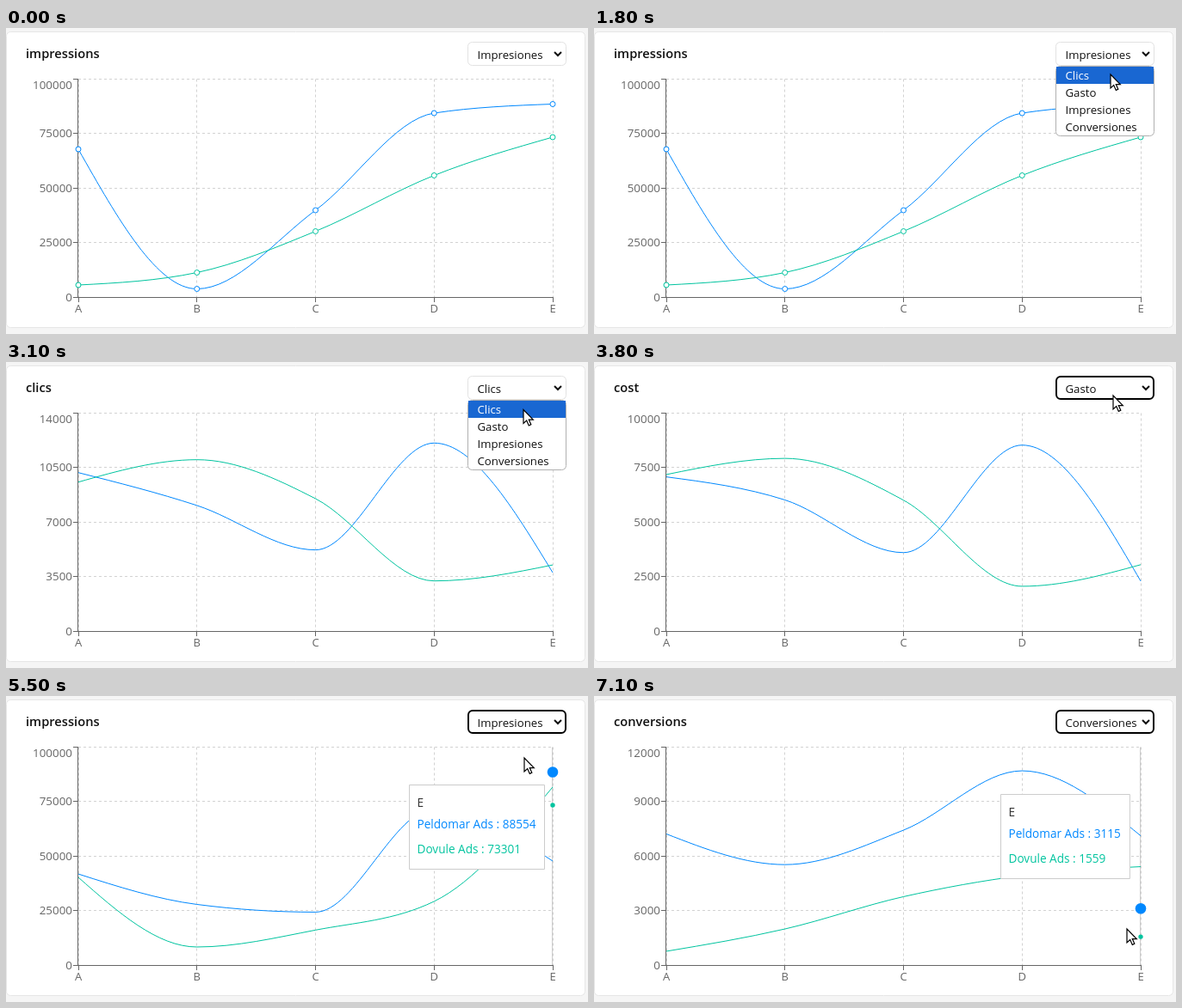
These frames come from a looping animation (676 px wide and 356 px high, 7200 ms). An HTML page with a canvas:

```html
<!DOCTYPE html>
<html lang="es">
<head>
<meta charset="utf-8">
<title>Metrics chart</title>
<style>
html, body { margin: 0; width: 100%; height: 100%; overflow: hidden; background: #f5f5f5; }
canvas { display: block; }
</style>
</head>
<body>
<canvas id="stage" width="676" height="356"></canvas>
<script>
const ctx = document.getElementById('stage').getContext('2d');
const LOOP = 7200, STEP = 100, MORPH = 1500;
const FONT = '"Open Sans", "Noto Sans", sans-serif';
const BLUE = '#0088fe', GREEN = '#00c49f';
const TOP = 59.5, BOTTOM = 313;
const XS = [0, 1, 2, 3, 4].map(i => 84 + i * 137.75);
const OPTIONS = ['Clics', 'Gasto', 'Impresiones', 'Conversiones'];

// Line heights are in stage pixels, one per category.
const VIEWS = {
  impressions: { option: 2, max: 100000, last: [88554, 73301],
    blue: [141, 303.5, 212, 99, 88.5], green: [299, 284.5, 236.5, 171.5, 127] },
  clics: { option: 0, max: 14000,
    blue: [128, 159, 219, 94, 254], green: [130.5, 103.8, 154.5, 259.5, 242.4] },
  cost: { option: 1, max: 10000,
    blue: [260, 193.6, 283, 157, 275], green: [140.5, 298, 301, 293, 89] },
  conversions: { option: 3, max: 12000, last: [3115, 1559],
    blue: [182.7, 73.8, 92.3, 73.4, 247.2], green: [294.7, 255.7, 230, 251.6, 280.1] }
};
const SELECTIONS = [
  { at: -MORPH, name: 'impressions' },
  { open: 1300, at: 2034, name: 'clics' },
  { open: 2900, at: 3710, name: 'cost' },
  { open: 4200, at: 5100, name: 'impressions' },
  { open: 6000, at: 6684, name: 'conversions' }
];
const POINTER = [
  [300, 676, 85], [800, 606, 38], [1000, 603, 34], [1400, 603, 34], [1800, 600, 54],
  [2034, 600, 55], [2400, 598, 37], [2900, 600, 37], [3300, 602, 74], [3700, 603, 72],
  [3800, 603, 39], [4200, 601, 39], [4500, 599, 84], [4800, 600, 95], [5100, 601, 95],
  [5500, 602, 72], [5800, 603, 35], [6000, 603, 35], [6400, 605, 114], [6700, 608, 115],
  [7100, 619, 271]
];
const TOOLTIP = [
  [5100, 468, 105], [5500, 468, 103], [5700, 468, 85], [6684, 468, 90], [7100, 472, 114]
];

const mix = (a, b, p) => a + (b - a) * p;

function track(keys, t) {
  let i = keys.findIndex(k => k[0] > t);
  if (i < 0) i = keys.length;
  const a = keys[Math.max(0, i - 1)], b = keys[Math.min(i, keys.length - 1)];
  const p = a === b ? 0 : (t - a[0]) / (b[0] - a[0]);
  return { x: mix(a[1], b[1], p), y: mix(a[2], b[2], p) };
}

// cubic-bezier(.25, .1, .25, 1)
function ease(x) {
  if (x <= 0 || x >= 1) return x <= 0 ? 0 : 1;
  let lo = 0, hi = 1, s;
  for (let i = 0; i < 24; i++) {
    s = (lo + hi) / 2;
    if (0.75 * s * (1 - s) + s ** 3 < x) lo = s; else hi = s;
  }
  return 0.3 * s * (1 - s) ** 2 + 3 * s * s * (1 - s) + s ** 3;
}

function line(x1, y1, x2, y2, color, dash = []) {
  ctx.strokeStyle = color;
  ctx.lineWidth = 1;
  ctx.setLineDash(dash);
  ctx.beginPath();
  ctx.moveTo(x1, y1);
  ctx.lineTo(x2, y2);
  ctx.stroke();
  ctx.setLineDash([]);
}

function box(x, y, w, h, radius, border, width = 1) {
  ctx.beginPath();
  ctx.roundRect(x, y, w, h, radius);
  ctx.fillStyle = '#fff';
  ctx.fill();
  ctx.strokeStyle = border;
  ctx.lineWidth = width;
  ctx.stroke();
}

function text(str, x, y, size, color, align = 'left', weight = 400) {
  ctx.font = `${weight} ${size}px ${FONT}`;
  ctx.textAlign = align;
  ctx.fillStyle = color;
  ctx.fillText(str, x, y);
}

function disc(x, y, r, fill, stroke) {
  ctx.beginPath();
  ctx.arc(x, y, r, 0, Math.PI * 2);
  ctx.fillStyle = fill;
  ctx.fill();
  if (stroke) {
    ctx.strokeStyle = stroke;
    ctx.lineWidth = 1;
    ctx.stroke();
  }
}

// Monotone cubic through equally spaced points.
function curve(ys, color) {
  const h = XS[1] - XS[0];
  const slope = ys.slice(1).map((y, i) => (y - ys[i]) / h);
  const tan = ys.map((_, i) => {
    if (!i || i === ys.length - 1) return 0;
    const a = slope[i - 1], b = slope[i];
    return (Math.sign(a) + Math.sign(b)) * Math.min(Math.abs(a), Math.abs(b), Math.abs(a + b) / 4);
  });
  const n = ys.length - 1;
  tan[0] = (3 * slope[0] - tan[1]) / 2;
  tan[n] = (3 * slope[n - 1] - tan[n - 1]) / 2;
  ctx.beginPath();
  ctx.moveTo(XS[0], ys[0]);
  for (let i = 0; i < n; i++) {
    ctx.bezierCurveTo(XS[i] + h / 3, ys[i] + tan[i] * h / 3,
      XS[i + 1] - h / 3, ys[i + 1] - tan[i + 1] * h / 3, XS[i + 1], ys[i + 1]);
  }
  ctx.strokeStyle = color;
  ctx.lineWidth = 1;
  ctx.stroke();
}

function drawAxes(max) {
  for (let k = 0; k < 5; k++) {
    const y = mix(BOTTOM, TOP, k / 4);
    const rowY = Math.floor(y) + 0.5, colX = Math.floor(XS[k]) + 0.5;
    line(84, rowY, 635, rowY, '#d2d2d2', [3, 3]);
    line(colX, TOP, colX, BOTTOM, '#d2d2d2', [3, 3]);
  }
  line(83.5, TOP, 83.5, BOTTOM + 1, '#666');
  line(84, 313.5, 635, 313.5, '#666');
  for (let k = 0; k < 5; k++) {
    const y = Math.floor(mix(BOTTOM, TOP, k / 4)) + 0.5;
    const x = Math.floor(XS[k]) + 0.5;
    line(78, y, 84, y, '#666');
    line(x, 313, x, 319, '#666');
    text(String(max * k / 4), 77, k === 4 ? 71 : y + 4.7, 13.4, '#666', 'right');
    text('ABCDE'[k], XS[k], 331, 13, '#666', 'center');
  }
}

function drawTooltip(view, t) {
  const { x, y } = track(TOOLTIP, t);
  const [first, second] = view.last;
  box(Math.round(x) + 0.5, Math.round(y) + 0.5, 121.5 + 7.1 * String(first).length, 98, 0, '#ccc');
  text('E', x + 9.5, y + 26, 13.6, '#333');
  text(`Peldomar Ads : ${first}`, x + 9.5, y + 50.5, 13.6, BLUE);
  text(`Dovule Ads : ${second}`, x + 9.5, y + 79.5, 13.6, GREEN);
}

function drawSelect(option, focused) {
  if (focused) box(537, 17, 113, 26, 5, '#000', 2);
  else box(536.5, 16.5, 114, 27, 5, '#e2e2e2');
  text(OPTIONS[option], 547.5, 36, 13.2, '#111');
  ctx.beginPath();
  ctx.moveTo(637, 28);
  ctx.lineTo(641, 32);
  ctx.lineTo(645, 28);
  ctx.strokeStyle = '#111';
  ctx.lineWidth = 2;
  ctx.stroke();
}

function drawMenu(active) {
  box(536.5, 44.5, 114, 81, 5, '#b0b0b0');
  OPTIONS.forEach((name, i) => {
    if (i === active) {
      ctx.fillStyle = '#1967d2';
      ctx.fillRect(537, 45 + i * 20, 113, 20);
    }
    text(name, 547.5, 60 + i * 20, 13.2, i === active ? '#fff' : '#111');
  });
}

function drawPointer({ x, y }) {
  const shape = [[0, 0], [0, 16], [3.7, 12.6], [6.3, 18.4], [8.8, 17.3], [6.3, 11.6], [11.3, 11.6]];
  ctx.beginPath();
  shape.forEach(([dx, dy]) => ctx.lineTo(x + dx, y + dy));
  ctx.closePath();
  ctx.fillStyle = '#fff';
  ctx.fill();
  ctx.strokeStyle = '#000';
  ctx.lineWidth = 1.2;
  ctx.stroke();
}

function draw(t) {
  const index = SELECTIONS.findLastIndex(s => t >= s.at);
  const current = SELECTIONS[index], next = SELECTIONS[index + 1];
  const view = VIEWS[current.name];
  const previous = VIEWS[SELECTIONS[Math.max(0, index - 1)].name];
  const progress = ease((t - current.at) / MORPH);
  const open = Boolean(next) && t >= next.open;
  const pointer = track(POINTER, t);
  const hovering = !open && view.last && t >= POINTER[0][0] && pointer.y > TOP && pointer.x < 640;

  ctx.fillStyle = '#f5f5f5';
  ctx.fillRect(0, 0, 676, 356);
  box(0.5, 4.5, 672, 344, 5, '#e6e6e6');
  text(current.name, 23, 35, 14.7, '#111', 'left', 600);
  drawAxes(view.max);
  if (hovering) line(634.5, TOP, 634.5, BOTTOM, '#ccc');

  const series = [['blue', BLUE], ['green', GREEN]];
  for (const [key, color] of series) {
    curve(view[key].map((y, i) => mix(previous[key][i], y, progress)), color);
  }
  if (progress === 1) {
    for (const [key, color] of series) {
      view[key].forEach((y, i) => disc(XS[i], y, 3, '#fff', color));
    }
  }
  if (hovering) {
    disc(XS[4], view.blue[4], 6.3, BLUE);
    disc(XS[4], view.green[4], 2.7, GREEN);
    drawTooltip(view, t);
  }
  drawSelect(view.option, index > 0 && !open);
  if (open) {
    const over = Math.floor((pointer.y - 45) / 20);
    drawMenu(over < 0 ? view.option : Math.min(over, 3));
  }
  if (t >= POINTER[0][0]) drawPointer(pointer);
}

const start = performance.now();
function tick() {
  const elapsed = Math.max(0, performance.now() - start) % LOOP;
  draw(Math.floor(elapsed / STEP) * STEP);
  requestAnimationFrame(tick);
}
tick();
</script>
</body>
</html>
```
